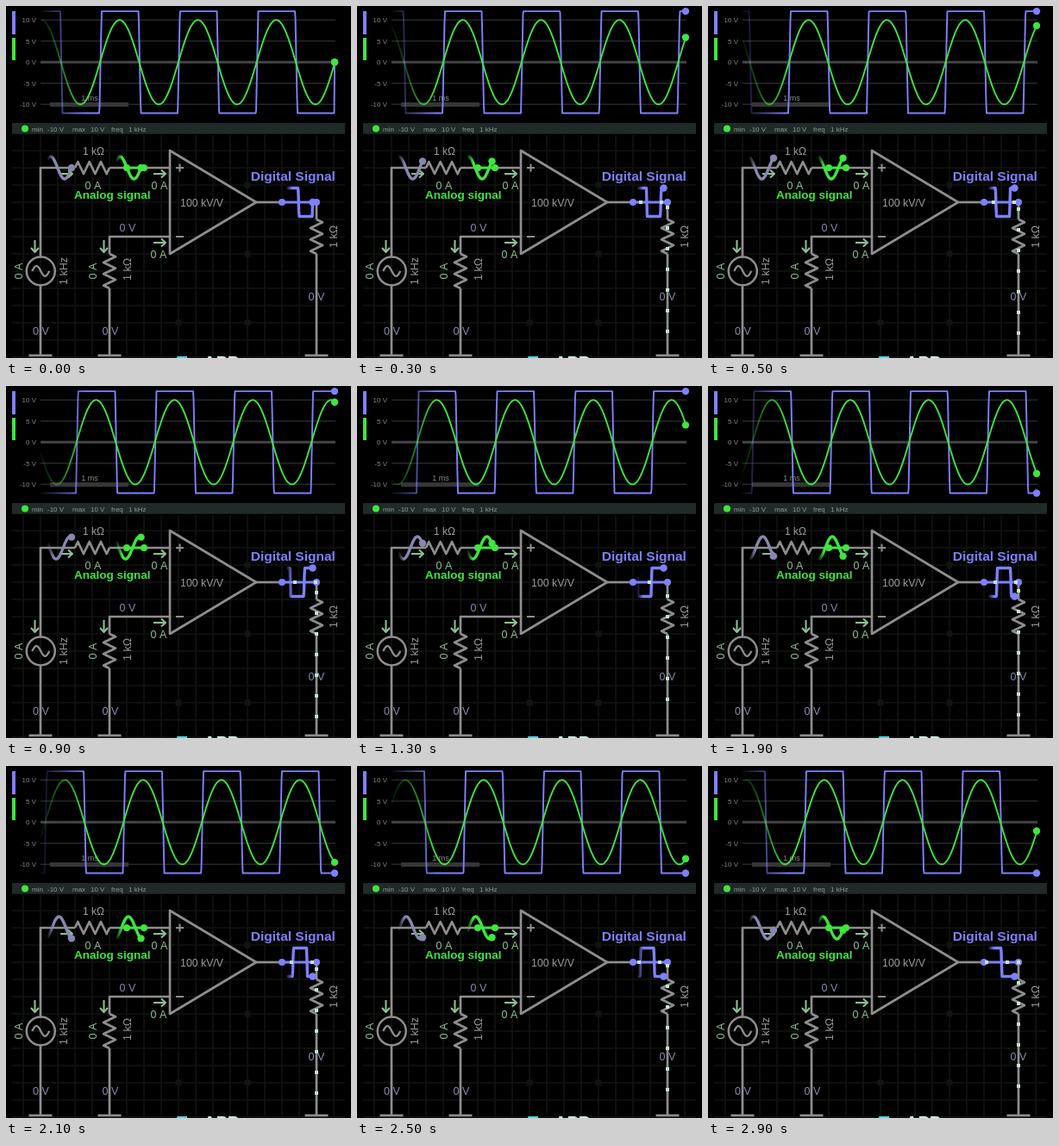
An HTML page with a canvas for the animation above (3 s loop, 400 px wide and 409 px high).

```html
<!DOCTYPE html>
<html lang="en">
<head>
<meta charset="utf-8">
<title>Comparator circuit</title>
<style>
  html, body { margin: 0; width: 100%; height: 100%; overflow: hidden; background: #000; }
  canvas { display: block; }
</style>
</head>
<body>
<canvas id="stage" width="400" height="409"></canvas>
<script>
const ctx = document.getElementById('stage').getContext('2d');
const FONT = 'Arial, "Liberation Sans", sans-serif';
const GREEN = '#3ee63e', BLUE = '#8080ff', WIRE = '#8e8e8e', LILAC = '#8888ae', MINT = '#8fbd96';
const STEP = 100, STEPS = 30;

const sine = a => Math.sin(a);
// Amplified sine, clipped at the supply rails
const clipped = a => Math.max(-1, Math.min(1, 11.5 * Math.sin(a)));

function line(points, color = WIRE, width = 2.7, close = false) {
  ctx.beginPath();
  points.forEach(([x, y]) => ctx.lineTo(x, y));
  if (close) ctx.closePath();
  ctx.strokeStyle = color;
  ctx.lineWidth = width;
  ctx.stroke();
}

function dot(x, y, color, r = 4) {
  ctx.beginPath();
  ctx.arc(x, y, r, 0, 2 * Math.PI);
  ctx.fillStyle = color;
  ctx.fill();
}

function rect(x, y, w, h, color) {
  ctx.fillStyle = color;
  ctx.fillRect(x, y, w, h);
}

function text(str, x, y, color, size = 12.5, align = 'center', weight = '') {
  ctx.font = `${weight} ${size}px ${FONT}`;
  ctx.textAlign = align;
  ctx.fillStyle = color;
  ctx.fillText(str, x, y);
}

function upright(str, x, y, color) {
  ctx.save();
  ctx.translate(x, y);
  ctx.rotate(-Math.PI / 2);
  text(str, 0, 0, color);
  ctx.restore();
}

function arrow(x, y, angle) {
  ctx.save();
  ctx.translate(x, y);
  ctx.rotate(angle);
  line([[-7, 0], [7, 0]], MINT, 2.1);
  line([[2, -4.5], [7, 0], [2, 4.5]], MINT, 2.1);
  ctx.restore();
}

// Zigzag of 40 px starting at (x, y)
function resistor(x, y, angle) {
  const points = [[0, 0]];
  for (let i = 0; i < 6; i++) points.push([(i + 0.5) * 40 / 6, i % 2 ? 7 : -7]);
  points.push([40, 0]);
  ctx.save();
  ctx.translate(x, y);
  ctx.rotate(angle);
  line(points);
  ctx.restore();
}

function ground(x) {
  line([[x - 13.5, 406], [x + 13.5, 406]]);
}

function fade(color, x0, x1) {
  const g = ctx.createLinearGradient(x0, 0, x1, 0);
  g.addColorStop(0, color + '10');
  g.addColorStop(1, color);
  return g;
}

// Trace whose newest value sits at x1; "lead" moves the older part to the right
function trace({ x0, x1, y, amp, period, lead = 0, wave, color, width, blend, r }, phase) {
  const points = [];
  for (let x = x0; x < x1; x += 0.5) {
    const a = phase + (x - x1 - lead) / period * 2 * Math.PI;
    points.push([x, y - amp * wave(a)]);
  }
  const end = y - amp * wave(phase);
  points.push([x1, end]);
  line(points, fade(color, x0, x0 + blend), width);
  dot(x1, end, color, r);
}

const scope = { x0: 40, x1: 381, y: 65.3, period: 90.8, width: 1.9, blend: 52, r: 4.2 };
const probe = { period: 32.5, width: 3.4, blend: 7, r: 4.2 };
const TRACES = [
  { ...scope, amp: 59.2, wave: clipped, color: BLUE, lead: 1 },
  { ...scope, amp: 49, wave: sine, color: GREEN, lead: 0.4 },
];
const PROBES = [
  { ...probe, x0: 48, x1: 76, y: 188, amp: 13, wave: sine, color: LILAC },
  { ...probe, x0: 127.5, x1: 156.5, y: 188, amp: 13, wave: sine, color: GREEN },
  { ...probe, x0: 325, x1: 355.5, y: 228, amp: 16.5, wave: clipped, color: BLUE },
];

function drawScope(phase) {
  rect(7, 6, 4, 27, BLUE);
  rect(7, 37, 4, 26, GREEN);
  ['10 V', '5 V', '0 V', '-5 V', '-10 V'].forEach((label, i) => {
    const y = 16.3 + i * 24.5;
    line([[40, y], [382, y]], i === 2 ? '#444448' : '#242929', i === 2 ? 3 : 1.6);
    text(label, 35, y + 3, '#858585', 8, 'right');
  });
  rect(51, 112, 91, 5, '#363638');
  text('1 ms', 97, 110, '#8c8c8c', 9);
  TRACES.forEach(t => trace(t, phase));

  rect(7, 136, 386, 12.7, '#202a28');
  dot(22, 142.5, GREEN);
  [['min', 30], ['-10 V', 48], ['max', 77], ['10 V', 98], ['freq', 122], ['1 kHz', 142]]
    .forEach(([s, x]) => text(s, x, 145.5, '#909896', 8, 'left'));
}

function drawGrid() {
  for (let x = 20; x < 393; x += 20) line([[x, 150], [x, 409]], '#101510', 1.6);
  for (let y = 168; y < 409; y += 20) line([[7, y], [393, y]], '#101510', 1.6);
  [[280, 208], [280, 288], [200, 368], [280, 368]]
    .forEach(([x, y]) => rect(x - 3.5, y - 3.5, 7, 7, '#101510'));
}

function drawCircuit() {
  const down = Math.PI / 2;
  line([[40, 406], [40, 325]]);
  line([[40, 291], [40, 188], [80, 188]]);
  resistor(80, 188, 0);
  line([[120, 188], [190, 188]]);
  line([[190, 268], [120, 268], [120, 288]]);
  resistor(120, 288, down);
  line([[120, 328], [120, 406]]);
  line([[290, 228], [320, 228]]);
  line([[360, 228], [360, 248]]);
  resistor(360, 248, down);
  line([[360, 288], [360, 406]]);
  [40, 120, 360].forEach(ground);

  line([[190, 168], [190, 288], [290, 228]], WIRE, 2.7, true);
  line([[197, 188], [206, 188]], WIRE, 2);
  line([[201.5, 183.5], [201.5, 192.5]], WIRE, 2);
  line([[197, 268], [206, 268]], WIRE, 2);

  ctx.beginPath();
  ctx.arc(40.3, 308, 16.5, 0, 2 * Math.PI);
  ctx.lineWidth = 2.5;
  ctx.stroke();
  const wave = [];
  for (let i = -10; i <= 10; i++) wave.push([40.3 + i, 308 + 6 * Math.sin(i * Math.PI / 10)]);
  line(wave, WIRE, 2.3);

  [[70, 195], [178, 195], [178, 275]].forEach(([x, y]) => arrow(x, y, 0));
  [33.5, 113.5].forEach(x => arrow(x, 279, down));
}

function drawLabels() {
  const gray = '#999';
  text('1 kΩ', 101.5, 173, gray, 12);
  text('100 kV/V', 227, 233, gray, 12.3);
  upright('1 kΩ', 145, 306, gray);
  upright('1 kΩ', 384, 268, gray);
  upright('1 kHz', 71, 308, gray);
  [[101, 213], [178, 213], [177, 293]].forEach(([x, y]) => text('0 A', x, y, MINT));
  upright('0 A', 18.7, 308, MINT);
  upright('0 A', 104.7, 308, MINT);
  [[141, 262], [40.5, 382], [121, 382], [360, 342]].forEach(([x, y]) => text('0 V', x, y, LILAC));
  text('Analog signal', 79, 224, GREEN, 13.5, 'left', 'bold');
  text('Digital Signal', 283.7, 203, BLUE, 15.5, 'left', 'bold');
  // Caption cut off by the lower edge
  text('Try', 198, 420.5, '#4fd0dc', 20, 'left', 'bold');
  text('APP', 229, 420.5, '#c8e4e6', 20, 'left', 'bold');
}

// Charge moves out in the first half of the loop and back in the second
function drawCurrent(step) {
  if (step % 15 === 0) return;
  const shift = step < 15 ? step - 9 : 17 - step;
  const wrap = v => (v % 24 + 24) % 24;
  const mark = (x, y) => rect(x - 2, y - 2, 4, 4, '#c5e5cc');
  for (let x = 320 + wrap(15 + shift); x <= 361; x += 24) mark(x, 228);
  for (let y = 228 + wrap(12 + shift); y <= 387; y += 24) mark(360, y);
}

function draw(step) {
  const phase = step / STEPS * 2 * Math.PI;
  rect(0, 0, 400, 409, '#000');
  ctx.lineJoin = 'round';
  drawScope(phase);
  drawGrid();
  drawCircuit();
  line([[140, 188], [160, 188]], GREEN, 2.8);
  line([[320, 228], [360, 228]], BLUE, 2.8);
  [140, 160].forEach(x => dot(x, 188, GREEN));
  [320, 360].forEach(x => dot(x, 228, BLUE));
  PROBES.forEach(p => trace(p, phase));
  drawCurrent(step);
  drawLabels();
}

const start = performance.now();
function tick() {
  const elapsed = Math.max(0, performance.now() - start);
  draw(Math.floor(elapsed / STEP) % STEPS);
  requestAnimationFrame(tick);
}
tick();
</script>
</body>
</html>
```
